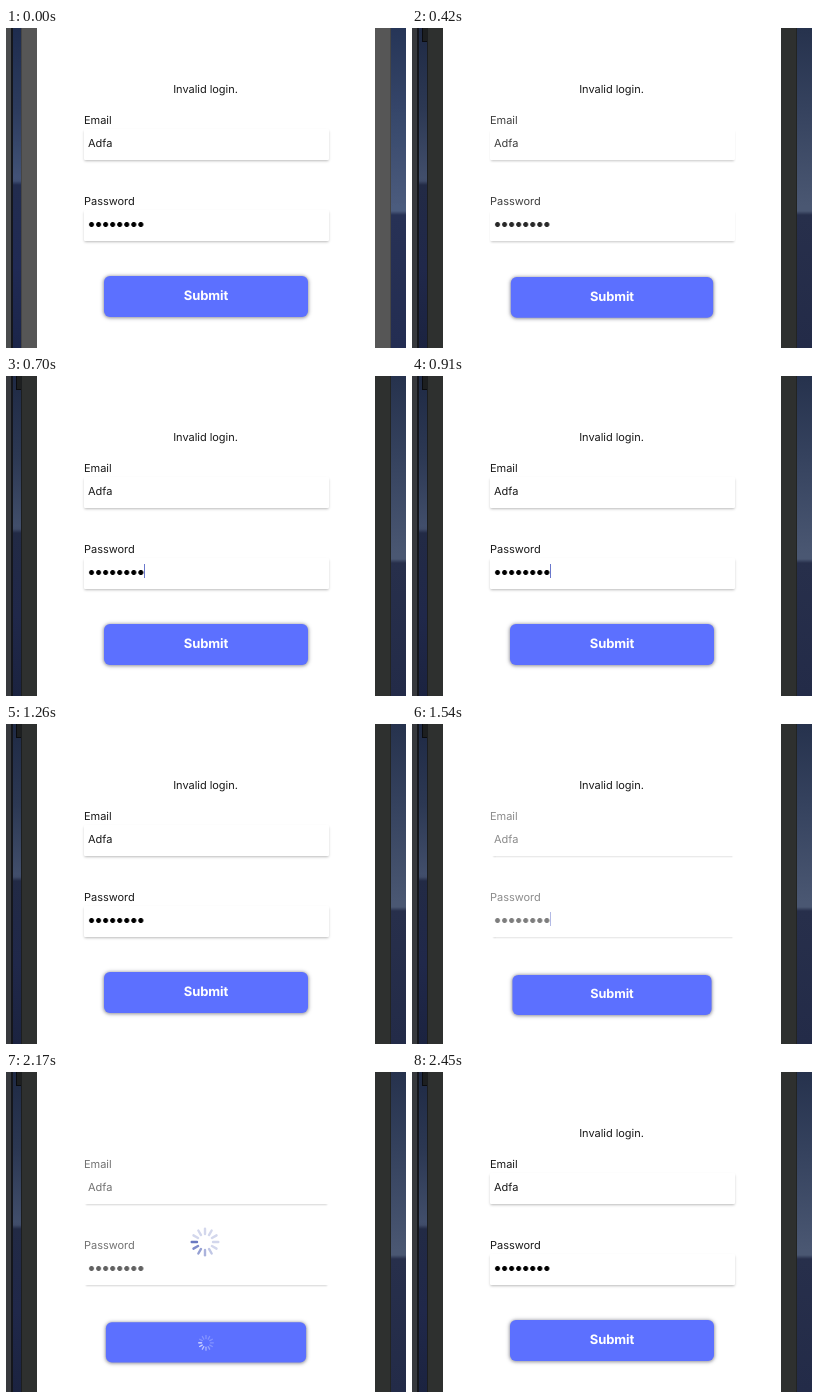
An HTML page that plays this animation: 400x320 px, repeating every 2.52 s.

```html
<!DOCTYPE html>
<html lang="en">
<head>
<meta charset="utf-8">
<title>Login form</title>
<style>
html, body { margin: 0; width: 100%; height: 100%; overflow: hidden; }
#stage {
  --press: 0;
  position: relative; width: 400px; height: 320px; overflow: hidden;
  background: #2e302f; color: #1a1a1a;
  font: 11px/16px Inter, "Open Sans", sans-serif;
  letter-spacing: -.03px; text-rendering: geometricPrecision;
}
#stage * { position: absolute; box-sizing: border-box; }
.sky {
  top: 0; height: 320px; width: 8px; left: 7px;
  background: linear-gradient(#1f2a45, #2c3853 80px, #414e6b 150px, #3f4b68 153px, #222a45 157px, #20284a 240px, #1b2340);
}
.sky.right {
  left: 385px; width: 15px;
  background: linear-gradient(#26324d, #35425e 80px, #4a5772 178px, #4a5772 183px, #272f4b 187px, #232b48);
}
.edge { left: 0; top: 0; width: 7px; height: 320px; background: #37393d; border-right: 2px solid #14161b; }
.notch { left: 10px; top: 0; width: 6px; height: 14px; background: #1d1f20; border: solid #0b0c0f; border-width: 0 0 1px 1px; }
.bezel { top: 0; width: 16px; height: 320px; left: 15px; background: #2e302f; border-left: 1px solid #1c1e1f; }
.bezel.right { left: 369px; border-left: 0; border-right: 1px solid #222423; }
.idle .sky { filter: brightness(1.05) saturate(1.2); }
.idle .edge { background: #4a4c4d; }
.idle .bezel { background: #565656; border-color: #454545; }
.idle .notch { display: none; }
.page { left: 31px; top: 0; width: 338px; height: 320px; background: #fff; }
.error { left: 0; width: 399px; top: 53.3px; text-align: center; }
.form { inset: 0; opacity: calc(1 - .5 * var(--press)); }
.label { left: 78px; }
.field {
  left: 78px; width: 245px; height: 31px; background: #fff; border-radius: 1px;
  box-shadow: 0 calc(1.5px + 2px * var(--press)) calc(2.8px - 1.3px * var(--press))
    calc(-.5px - 2px * var(--press)) rgba(0, 0, 0, .28);
}
.field span { left: 4px; top: 6px; }
.dots {
  left: 3.5px; top: 10.5px; width: 56.4px; height: 7px;
  background: radial-gradient(circle, #000 2.1px, transparent 2.9px) 0 0 / 7.05px 7px;
}
#caret { left: 59.5px; top: 6px; width: 1.5px; height: 14px; background: #6a78cc; }
#button {
  left: 98px; top: 248px; width: 204px; height: 41px; border-radius: 6px;
  background: #5c70ff; color: #fff; text-align: center;
  font-size: 13px; line-height: 41px; font-weight: 700; letter-spacing: -.1px;
  box-shadow: 0 .5px 3.5px .8px rgba(50, 50, 70, .5);
  transform: translateY(calc(2.4px * var(--press))) scale(calc(1 - .024 * var(--press)));
}
#button span { inset: 0; }
svg { overflow: visible; }
.spinner { left: 199px; top: 170px; width: 1px; height: 1px; stroke: #4a5cb4; stroke-width: 2.4; }
#button .spinner { left: 102px; top: 20.5px; stroke: #fff; transform: scale(.56); transform-origin: 0 0; }
</style>
</head>
<body>
<div id="stage">
  <div class="sky"></div>
  <div class="sky right"></div>
  <div class="edge"></div>
  <div class="notch"></div>
  <div class="bezel"></div>
  <div class="bezel right"></div>
  <div class="page"></div>
  <div class="error ready">Invalid login.</div>
  <div class="form">
    <div class="label" style="top:83.5px">Email</div>
    <div class="field" style="top:100.5px"><span>Adfa</span></div>
    <div class="label" style="top:165.3px">Password</div>
    <div class="field" style="top:182px"><div class="dots"></div><div id="caret"></div></div>
  </div>
  <div id="button"><span class="ready">Submit</span><svg class="spinner busy"></svg></div>
  <svg class="spinner busy"></svg>
</div>
<script>
const LOOP = 2520, STEP = 70;
const taps = [400, 950, 1480, 2030];
const pressCurve = [[0, 0], [60, 1], [110, 1], [140, .78], [160, .62], [270, 0]];
const SPOKES = 12;

const stage = document.getElementById("stage");
const caret = document.getElementById("caret");
const ready = stage.querySelectorAll(".ready");
const busy = stage.querySelectorAll(".busy");
const spinners = [...stage.querySelectorAll(".spinner")];

for (const svg of spinners) {
  for (let i = 0; i < SPOKES; i++) {
    const line = document.createElementNS("http://www.w3.org/2000/svg", "line");
    line.setAttribute("y1", -8);
    line.setAttribute("y2", -13.3);
    line.setAttribute("stroke-linecap", "round");
    line.setAttribute("transform", `rotate(${i * 360 / SPOKES})`);
    svg.append(line);
  }
}

function sample(points, x) {
  for (let i = 1; i < points.length; i++) {
    const [x0, y0] = points[i - 1], [x1, y1] = points[i];
    if (x < x1) return y0 + (y1 - y0) * Math.max(0, x - x0) / (x1 - x0);
  }
  return points[points.length - 1][1];
}

function spin(head) {
  for (const svg of spinners) {
    [...svg.children].forEach((line, i) => {
      const behind = (head - i + 2 * SPOKES) % SPOKES;
      line.style.opacity = Math.max(.24, .82 - behind * .12);
    });
  }
}

function toggle(nodes, shown) {
  for (const node of nodes) node.style.display = shown ? "" : "none";
}

function draw(t) {
  const tap = taps.filter(s => s <= t).pop();
  const age = tap === undefined ? -1 : t - tap;
  const loading = age >= 100 && age < 290;
  stage.classList.toggle("idle", t < 420);
  stage.style.setProperty("--press", sample(pressCurve, age));
  toggle(ready, !loading);
  toggle(busy, loading);
  if (loading) spin(9 + Math.floor((age - 120) / 83));
  toggle([caret], t >= 480 && (t - 480) % 1030 < 530);
}

const start = performance.now();
function frame() {
  const t = (performance.now() - start) % LOOP;
  draw(Math.floor(t / STEP) * STEP);
  requestAnimationFrame(frame);
}
frame();
</script>
</body>
</html>
```
